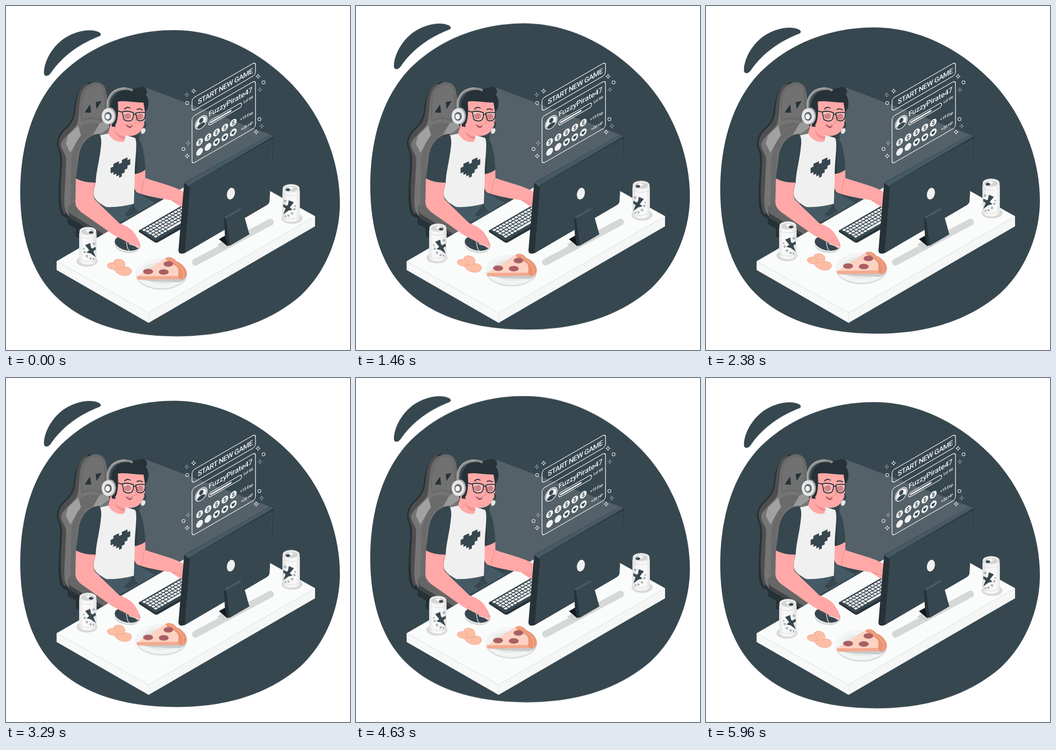
Animation, 748 px wide and 748 px high, one loop 6000 ms. Source, as an HTML page:

```html
<!DOCTYPE html>
<html lang="en">
<head>
<meta charset="utf-8">
<title>Gamer at a desk</title>
<style>
  html, body { margin: 0; width: 100%; height: 100%; overflow: hidden; background: #fff; }
  svg { display: block; width: 100%; height: 100%; }
  text { font-family: Roboto, "Open Sans", sans-serif; font-weight: 500; }
  .bob { animation: bob 3s -.02s linear infinite; }
  .slow { animation-duration: 6s; }
  @keyframes bob {
    0%, 100% { transform: translateY(0); }
    50% { transform: translateY(-15px); }
  }
  .dark { fill: #37474f; }
  .ink { fill: #263238; }
  .skin { fill: #ffa8a7; }
  .line { fill: none; stroke: #f0f0f0; stroke-width: 1.5; }
  .pen { fill: none; stroke: #263238; stroke-width: 2; stroke-linecap: round; stroke-linejoin: round; }
  .thin { fill: none; stroke: #e9807f; stroke-width: 1; stroke-linecap: round; }
</style>
</head>
<body>
<svg viewBox="0 0 748 748">
  <defs>
    <linearGradient id="tin" x1="0" x2="1" y1="0" y2="0">
      <stop offset="0" stop-color="#e6e6e6"/>
      <stop offset=".25" stop-color="#fafafa"/>
      <stop offset=".75" stop-color="#f5f5f5"/>
      <stop offset="1" stop-color="#dedede"/>
    </linearGradient>
    <path id="star" d="M0-5Q.7-.7 5 0Q.7.7 0 5Q-.7.7-5 0Q-.7-.7 0-5Z"/>
    <path id="cross" d="M0-4.5v3M0 1.5v3M-4.5 0h3M1.5 0h3"/>
    <circle id="ring" r="3.4"/>
    <g id="can">
      <ellipse cx="176" cy="555" rx="23" ry="12" fill="#d9d9d9"/>
      <path d="M160 489L159 497V553C160 565 196 566 197 553V497L196 489Z" fill="url(#tin)"/>
      <path d="M159 498C164 508 192 508 197 498M160 549C165 558 191 558 197 549" fill="none" stroke="#d6d6d6"/>
      <ellipse cx="178" cy="489.500" rx="18" ry="8.700" fill="#f2f2f2" stroke="#dcdcdc"/>
      <ellipse cx="178" cy="490.500" rx="14.500" ry="6.300" fill="#d3d3d3"/>
      <path d="M172 488L180 485L187 489L180 494Z" fill="#f5f5f5"/>
      <ellipse cx="185" cy="492.500" rx="5" ry="3" class="dark"/>
      <path d="M172 520L183 515.500L185 526L194 530L190 533.500L195 546L184 538L175 536L181 531Z" class="dark"/>
      <path d="M195 524L195 531L188 527Z" class="dark"/>
      <g fill="none" stroke="#37474f" stroke-width=".8">
        <circle cx="191" cy="517" r="2"/><circle cx="171" cy="535" r="1.800"/>
        <circle cx="176" cy="544" r="2"/><circle cx="184" cy="549" r="1.600"/>
        <circle cx="190" cy="550" r="1"/><circle cx="169" cy="528" r="1"/>
      </g>
    </g>
  </defs>

  <g class="bob dark">
    <g transform="translate(0 .4)">
      <path d="M365 52C465 52 554 101 620 168C690 240 726 340 726 428C726 504 694 580 640 630C570 690 480 718 372 718C260 718 168 691 107 630C48 572 31 482 31 405C31 300 60 215 110 158C175 88 270 52 365 52Z"/>
      <path d="M82.500 146C82 120 102 85 130 68C155 53 185 48 203 57C207 60 207.500 63 203 65.500C165 80 125 105 97 146C91 154 83 153 82.500 146Z"/>
    </g>
  </g>

  <path d="M303 177L580 282L390 385L380 425L290 405V290Z" fill="#fff" opacity=".145"/>

  <!-- chair -->
  <path d="M186 165C163 169 152 190 148 222C147 243 140 255 125 268C110 283 108 300 114 313C119 325 118 345 116 372C113 410 112 444 123 457L142 466L175 440L200 200Z" class="ink"/>
  <path d="M178 168C160 172 154 195 151 225C150 245 142 258 128 270C114 284 112 298 117 310C124 325 122 345 120 372C118 410 118 440 127 453L140 440L160 255Z" fill="#4f4f4f"/>
  <path d="M170 179C184 162 212 160 217 184C222 205 222 240 224 264L220 300L200 470L146 463C129 455 126 440 127 415L131 334C130 320 119 312 120 300C122 288 142 275 154 258C162 238 156 195 170 179Z" fill="#757575"/>
  <path d="M170 179C184 162 212 160 217 184L220 243L206 250L184 246L164 251C162 230 158 195 170 179Z" fill="#696969"/>
  <path d="M177 180C190 168 208 168 212 185L214 238L202 245L185 241L166 247C165 220 165 192 177 180Z" fill="#717171"/>
  <path d="M162 262C172 253 192 252 203 256L190 278C172 284 160 300 154 334L151 438L140 438L142 330Z" fill="#6b6b6b"/>
  <path d="M157 260L135 281L130 299L140 319L156 291L163 281Z" fill="#a1a1a1"/>
  <path d="M222 246L203 256L189 280L207 277L225 264Z" fill="#999"/>
  <path d="M183 214L171 231.500L185 232ZM195 209L208 206.500L197 224Z" class="ink"/>
  <path d="M134 463L152 462L170 474L204 490L212 497L202 502L163 484L162 505L152 502V484L134 474Z" class="ink"/>
  <path d="M134 437L142 451L214 496L206 500L138 461Z" fill="#3f4345"/>
  <path d="M135 436C140 428 154 428 162 434L228 480L246 497L216 498L140 452Q134 446 135 436Z" fill="#666"/>
  <path d="M150 434L205 470L228 492" fill="none" stroke="#777" stroke-width="2"/>

  <!-- legs -->
  <path d="M205 432L282 405L324 428L262 463L226 480Z" fill="#455a64"/>
  <path d="M271 424C280 430 270 441 257 454L266 458L288 446C276 440 284 432 271 424Z" class="dark"/>

  <!-- desk -->
  <path d="M110 555L310 667V689L110 574Z" fill="#f7f8f8"/>
  <path d="M310 667L672 457V479L310 689Z" fill="#f5f6f6"/>
  <path d="M110 555L472 345L672 457L310 667Z" fill="#fafcfb"/>
  <path d="M110 555L310 667L672 457M310 667V689" fill="none" stroke="#e3e5e5" stroke-width=".8"/>
  <path d="M412 557L575 470" stroke="#d6d8d7" stroke-width="15" stroke-linecap="round"/>
  <path d="M459 519L492 497L526 501L482 527Q474 530 459 519Z" fill="#d1d3d2"/>

  <!-- keyboard -->
  <path d="M289 488L384 433L430 455L329 511Q326 512 323 511L290 492Z" class="dark"/>
  <path d="M289 487V491L322 513Q326 516 330 514L400 474V468L329 509Q326 511 322 509Z" class="ink"/>
  <g id="keys" fill="#f0f0f0" transform="matrix(1 -.575 1 .575 296 487)"></g>

  <!-- far arm -->
  <path d="M278 364L303 354V374C330 384 362 390 388 405V438C376 437 368 428 358 422C330 418 302 412 286 406C276 400 277 382 278 364Z" class="skin"/>
  <path d="M301 375L294 407M361 423C370 423 376 428 384 431" class="thin"/>
  <path d="M280 285C292 290 298 308 301 332L303 356Q292 364 277 366L274 300Z" fill="#2e3c43"/>
  <path d="M283 285C294 290 300 310 303 356Q295 361 285 364Z" class="dark"/>

  <!-- torso -->
  <path d="M197 283L224 277L258 280L281 287C287 300 279 340 280 370L278 430C258 435 238 438 218 437C203 429 191 420 190 408C190 380 202 345 202 310Z" fill="#f0f0f0"/>
  <path d="M228 255L222 277C228 289 244 300 258 294L259 275Z" class="skin"/>
  <path d="M236 270C244 282 254 284 260 283L258 290C248 289 238 280 236 270Z" fill="#f08e8d"/>
  <path d="M1 0h2v1h1v-1h2v1h1v2h-1v1h-1v1h-1v1h-1v-1h-1v-1h-1v-1h-1v-2h1Z" transform="matrix(6.100 -2.800 0 6 227.500 346)" class="dark"/>
  <path d="M202 278C177 281 162 300 158 328L152 375Q171 385 195 384C196 358 204 335 207 300Q208 283 202 278Z" class="dark"/>

  <!-- mouse and near arm -->
  <ellipse cx="264" cy="520" rx="28.500" ry="17" fill="#d6d8d7" transform="rotate(8 264 520)"/>
  <ellipse cx="264" cy="517.500" rx="28" ry="16" fill="#f0f0f0" transform="rotate(10 264 518)"/>
  <ellipse cx="264" cy="516" rx="28" ry="15.500" class="dark" transform="rotate(12 264 516)"/>
  <path d="M152 375Q171 385 195 384C190 400 188 410 193 421L246 472C264 479 276 486 283 500C289 508 292 517 291 526C288 528 284 526 281 522L270 517C254 508 242 502 234 498L166 450C152 440 150 430 151 420Z" class="skin"/>
  <path d="M195 384C191 396 190 404 190 412" class="thin"/>
  <path d="M261 513C265 519 261 526 268 532M267 517C274 519 283 523 290 524" fill="none" stroke="#f0f0f0" stroke-width="1.400"/>

  <!-- head -->
  <path d="M229 235C225 205 238 184 263 181C276 184 285 176 298 176C307 178 309 187 304 193C313 204 310 222 305 228L298 240L260 250L240 263L230 262Z" class="ink"/>
  <path d="M243 208C260 205 276 210 299 210L302 229V249C301 260 296 269 289 276C280 283 266 285 254 279C245 274 240 266 237 259C243 253 245 230 243 208Z" class="skin"/>
  <path d="M258 224Q263 218 270 222M285 225Q291 222 297 226" class="pen" stroke-width="2.500"/>
  <path d="M253 230Q265 227 277 232Q278 245 272 249Q262 252 256 246ZM282 233Q292 230 303 232Q303 245 298 248Q290 252 285 247ZM277 235L282 236M253 231L243 228" class="pen" style="fill:#ffbdbb"/>
  <g id="eyes" fill="none" stroke="#9a444c" stroke-width="1.200"></g>
  <path d="M280 241L284 254L278 256" class="thin"/>
  <path d="M260 257Q266 261 275 258C275 264 270 267 266 264Q262 262 260 257Z" fill="#a94f57"/>
  <path d="M263 259Q268 261 274 259L272 261Q267 262 263 259Z" fill="#fff"/>
  <path d="M301 252Q307 259 299 266" class="pen"/>
  <ellipse cx="298.500" cy="271.500" rx="4.500" ry="6.500" fill="#e6e6e6" transform="rotate(25 298 271)"/>
  <path d="M223 227C218 200 231 180 262 180Q270 180 275 184" fill="none" stroke="#8c8c8c" stroke-width="5"/>
  <path d="M221 226C216 198 231 178 260 178" fill="none" stroke="#b3b3b3" stroke-width="2"/>
  <ellipse cx="227" cy="239" rx="12" ry="18" fill="#a6a6a6"/>
  <ellipse cx="222" cy="239.500" rx="14" ry="17" fill="#e6e6e6"/>
  <ellipse cx="222" cy="240" rx="8" ry="9.500" fill="#5f6a70"/>
  <ellipse cx="221" cy="240.500" rx="5" ry="6" fill="#f5f5f5"/>

  <!-- monitor -->
  <path d="M387 389Q387 384 392 382L572 281Q581 277 582 287L573 424Q572 430 567 433L389 537Q375 542 375 531Z" class="ink"/>
  <path d="M388 385L572 281Q579 278 581 284L404 387Q400 389 399 393Z" fill="#455a64"/>
  <path d="M400 395Q400 390 405 387L575 290Q580 287 580 293L572 423Q571 430 566 433L397 532Q389 538 389 529Z" class="dark"/>
  <path d="M580 288L572 424" stroke="#455a64" fill="none"/>
  <ellipse cx="489" cy="408" rx="8.500" ry="13" fill="#f0f0f0" transform="rotate(14 489 408)"/>
  <path d="M463 507L477 499L490 518L481 522Z" fill="#111a1f"/>
  <path d="M474 460L509 439L514 445L478 463Z" fill="#455a64"/>
  <path d="M474 460L479 462L487 520L481 521L476 500Z" class="ink"/>
  <path d="M478 462L512 443Q514 443 515 446L529 496L486 521Z" class="dark"/>
  <path d="M478 462L486 521L529 496" fill="none" stroke="#263238"/>

  <!-- floating menu -->
  <g transform="matrix(1 -.577 0 1 404.500 201.500)" fill="#f0f0f0">
    <rect width="138" height="27.500" rx="6" class="line"/>
    <text x="12.500" y="20" font-size="15.300" letter-spacing="-.7">START NEW GAME</text>
    <rect y="40" width="138" height="102" rx="6" class="line"/>
    <circle cx="20" cy="63" r="13" class="line"/>
    <circle cx="20" cy="63" r="11.500"/>
    <path d="M20 54a4.500 5 0 1 1 0 10a4.500 5 0 1 1 0-10ZM11 70Q13 65 20 65T29 70Q25 75 20 75T11 70Z" class="dark"/>
    <text x="36" y="60.500" font-size="15.500" letter-spacing="-.25">FuzzyPirate47</text>
    <rect x="36" y="70.300" width="72" height="9.500" rx="4.700" class="line"/>
    <rect x="39" y="73.300" width="47" height="3.500" rx="1.700"/>
    <g font-size="8.500" letter-spacing="-.35">
      <text x="112" y="75.500">Lvl 99</text>
      <text x="104.500" y="109">+15 Exp</text>
      <text x="106.500" y="131.500">+20 HP</text>
    </g>
    <g id="coins"></g>
  </g>
  <g id="sparks" class="line" style="stroke-width:1.200"></g>

  <!-- snacks -->
  <g class="bob slow">
    <use href="#can"/>
    <use href="#can" transform="matrix(-1 0 0 1 798 -93)"/>
    <g stroke="#ee9b7f" stroke-width=".8" fill="#fcbda4">
      <path d="M220 564C222 556 232 559 238 557C247 558 251 568 246 572C238 575 220 573 220 564Z"/>
      <path d="M234 556C237 549 250 549 256 555C262 562 258 571 250 574C242 573 243 563 234 556Z"/>
      <path d="M236 574C240 567 250 573 257 568C266 566 274 571 273 578C270 588 256 588 247 584Q239 580 236 574Z"/>
    </g>
    <ellipse cx="338" cy="584" rx="56" ry="33" fill="#d9dada"/>
    <ellipse cx="338" cy="581" rx="56" ry="33" fill="#f3f4f4"/>
    <ellipse cx="338" cy="581" rx="43" ry="24" fill="#e9eaea"/>
    <path d="M287 594L381 591L392 590Q389 598 376 601L320 599Z" fill="#c9cbcb"/>
    <path d="M285 587L380 586V594L287 595Q284 592 285 587Z" fill="#f4a98f"/>
    <path d="M285 588L347 548L371 560L382 587Z" fill="#fcd3c2"/>
    <path d="M347 549C352 543 365 547 370 555C384 560 395 574 393 585C390 595 380 597 376 592C372 585 378 576 372 568C363 559 352 558 347 549Z" fill="#eb9474"/>
    <path d="M350 548C363 549 366 559 372 561C382 566 388 577 386 593" fill="none" stroke="#f4aa8e" stroke-width="2"/>
    <g fill="#a95f64">
      <ellipse cx="353" cy="561" rx="10.500" ry="6"/>
      <ellipse cx="309" cy="577.500" rx="10.800" ry="6"/>
      <ellipse cx="343" cy="578.500" rx="10.800" ry="6"/>
    </g>
  </g>
</svg>
<script>
  const fill = (id, html) => { document.getElementById(id).innerHTML = html; };
  const range = n => [...Array(n).keys()];

  const spiral = (cx, cy, r, turns) => 'M' + range(41).map(i => {
    const a = i / 40 * turns * 2 * Math.PI, d = i / 40 * r;
    return (cx + d * Math.cos(a)).toFixed(1) + ' ' + (cy + d * .9 * Math.sin(a)).toFixed(1);
  }).join('L');

  fill('eyes', [[265, 239], [292, 240]].map(([x, y]) => `<path d="${spiral(x, y, 7.5, 2.6)}"/>`).join(''));

  fill('keys', range(5).map(row => range(15).map(col => {
    const space = row === 4 && col > 3 && col < 8;
    return `<rect x="${col * 6.8 + row % 2}" y="${row * 6.2}" width="${space ? 7 : 5.3}" height="4.6" rx=".7"/>`;
  }).join('')).join(''));

  const heart = 'M0 4.5C-6 0-4-4.500 0-2C4-4.500 6 0 0 4.500Z';
  fill('coins', range(5).map(i => {
    const x = 16.5 + i * 18.3;
    const mark = i > 1 ? `<path d="${heart}" transform="translate(${x} 125)" class="dark"/>` : '';
    return `<circle cx="${x}" cy="104" r="7.4"/><circle cx="${x}" cy="125" r="7.4"/>${mark}
      <text x="${x}" y="108" font-size="11" text-anchor="middle" class="dark" style="font-weight:700">$</text>`;
  }).join(''));

  const sparks = {
    star: [[408, 185], [548, 153], [544, 274], [394, 326]],
    cross: [[393, 193], [552, 182], [556, 261], [396, 298]],
    ring: [[394, 211], [560, 166], [551, 246], [386, 311]]
  };
  fill('sparks', Object.entries(sparks).map(([id, spots]) =>
    spots.map(([x, y]) => `<use href="#${id}" x="${x}" y="${y}"/>`).join('')).join(''));
</script>
</body>
</html>
```
